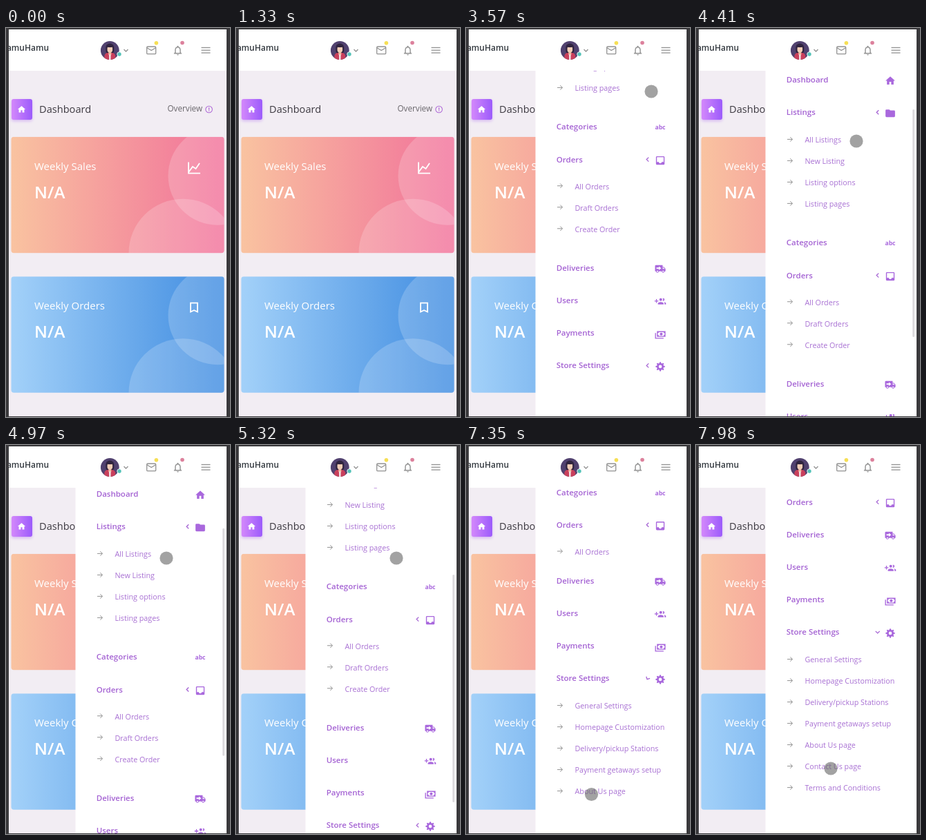
Recreate the animation shown at these times as an HTML page with a canvas. Size 324 px wide and 564 px high, loop 8 s.

```html
<!DOCTYPE html>
<html lang="en">
<head>
<meta charset="utf-8">
<title>Dashboard menu</title>
<style>
  html, body { margin: 0; width: 100%; height: 100%; overflow: hidden; background: #3a393c; }
  canvas { display: block; width: 324px; height: 564px; }
</style>
</head>
<body>
<canvas id="stage"></canvas>
<script>
const W = 324, H = 564, LOOP = 8000;
const canvas = document.getElementById('stage');
const ctx = canvas.getContext('2d');
const dpr = window.devicePixelRatio || 1;
canvas.width = W * dpr;
canvas.height = H * dpr;

const FONT = '"Open Sans", "Noto Sans", sans-serif';
const PURPLE = '#a462d3', ICON = '#a968dd', GREY = '#929292';

// Filled icons on a 24-unit grid
const ICONS = {
  home: 'M10 20v-6h4v6h5v-8h3L12 3 2 12h3v8z',
  folder: 'M10 4H4a2 2 0 0 0-2 2v12a2 2 0 0 0 2 2h16a2 2 0 0 0 2-2V8a2 2 0 0 0-2-2h-8z',
  inbox: 'M5 3h14a2 2 0 0 1 2 2v14a2 2 0 0 1-2 2H5a2 2 0 0 1-2-2V5a2 2 0 0 1 2-2zM5 5v10h4a3 3 0 0 0 6 0h4V5z',
  truck: 'M3 4h14v4h3l3 4v5h-2a3 3 0 0 1-6 0H9a3 3 0 0 1-6 0H1V6a2 2 0 0 1 2-2zM17 9.5V12h4.4l-1.9-2.5z' +
    'M4 9h5V6.5l5 4-5 4V12H4zM4.5 17a1.5 1.5 0 0 0 3 0 1.5 1.5 0 0 0-3 0zM16.5 17a1.5 1.5 0 0 0 3 0 1.5 1.5 0 0 0-3 0z',
  users: 'M8 10H5V7H3v3H0v2h3v3h2v-3h3zM10 8a3 3 0 0 0 6 0 3 3 0 0 0-6 0zM17.1 5.1a5 5 0 0 1 0 5.8 3 3 0 1 0 0-5.8z' +
    'M13 13c-2 0-6 1-6 3v2h12v-2c0-2-4-3-6-3zM19.6 13.2c.9.7 1.4 1.6 1.4 2.8v2h3v-2c0-1.5-2.4-2.5-4.4-2.8z',
  cash: 'M5 6h18v12H5zM9 8a2 2 0 0 1-2 2v4a2 2 0 0 1 2 2h10a2 2 0 0 1 2-2v-4a2 2 0 0 1-2-2z' +
    'M11 12a3 3 0 0 0 6 0 3 3 0 0 0-6 0zM1 10h2v10h16v2H1z',
  bell: 'M12 22a2 2 0 0 0 2-2h-4a2 2 0 0 0 2 2zM18 16v-5c0-3-1.6-5.6-4.5-6.3V4a1.5 1.5 0 0 0-3 0v.7C7.6 5.4 6 8 6 11v5l-2 2v1h16v-1z' +
    'M16 17H8v-6c0-2.5 1.5-4.5 4-4.5s4 2 4 4.5z'
};
for (const k in ICONS) ICONS[k] = new Path2D(ICONS[k]);

const MENU = [
  { label: 'Dashboard', icon: 'home' },
  { label: 'Listings', icon: 'folder', extra: 142, first: 40,
    subs: ['All Listings', 'New Listing', 'Listing options', 'Listing pages'] },
  { label: 'Categories', icon: 'abc' },
  { label: 'Orders', icon: 'inbox', extra: 110, first: 39,
    subs: ['All Orders', 'Draft Orders', 'Create Order'] },
  { label: 'Deliveries', icon: 'truck' },
  { label: 'Users', icon: 'users' },
  { label: 'Payments', icon: 'cash' },
  { label: 'Store Settings', icon: 'gear', extra: 218, first: 40, settings: true,
    subs: ['General Settings', 'Homepage Customization', 'Delivery/pickup Stations',
      'Payment getaways setup', 'About Us page', 'Contact Us page', 'Terms and Conditions'] }
];

// Keys are [time, value, value...]
const SCROLL = [[4060, 253], [4390, 85], [4930, 85], [5280, 191], [5380, 191], [5620, 253]];
const POINTER = [
  [2300, 332, 120], [2650, 287, 33], [2950, 287, 33], [3500, 268, 92], [3600, 268, 92],
  [3850, 232, 164], [5800, 232, 164], [6660, 173, 498], [7180, 173, 498], [7380, 182, 507], [7800, 195, 469]
];

const ramp = (t, a, b) => Math.min(1, Math.max(0, (t - a) / (b - a)));
const smooth = x => x * x * (3 - 2 * x);

function track(keys, t) {
  let i = 0;
  while (i < keys.length - 2 && t > keys[i + 1][0]) i++;
  const a = keys[i], b = keys[i + 1], p = smooth(ramp(t, a[0], b[0]));
  return a.slice(1).map((v, n) => v + (b[n + 1] - v) * p);
}

function rect(x, y, w, h, fill, r = 0) {
  ctx.beginPath();
  ctx.roundRect(x, y, w, h, r);
  ctx.fillStyle = fill;
  ctx.fill();
}

function disc(x, y, r, fill) {
  ctx.beginPath();
  ctx.arc(x, y, r, 0, Math.PI * 2);
  ctx.fillStyle = fill;
  ctx.fill();
}

function line(points, color, width = 1.2, closed = false) {
  ctx.beginPath();
  points.forEach(([x, y]) => ctx.lineTo(x, y));
  if (closed) ctx.closePath();
  ctx.strokeStyle = color;
  ctx.lineWidth = width;
  ctx.stroke();
}

function text(s, x, y, size, color, weight = 400, align = 'left') {
  ctx.font = `${weight} ${size}px ${FONT}`;
  ctx.textAlign = align;
  ctx.fillStyle = color;
  ctx.fillText(s, x, y);
}

function clipTo(x, y, w, h, draw) {
  ctx.save();
  ctx.beginPath();
  ctx.rect(x, y, w, h);
  ctx.clip();
  draw();
  ctx.restore();
}

function gradient(x0, x1, from, to) {
  const g = ctx.createLinearGradient(x0, 0, x1, 0);
  g.addColorStop(0, from);
  g.addColorStop(1, to);
  return g;
}

function gear(x, y) {
  ctx.beginPath();
  for (let i = 0; i < 32; i++) {
    const a = (i - 0.5) * Math.PI / 16, r = i % 4 < 2 ? 6.8 : 5;
    ctx.lineTo(x + r * Math.cos(a), y + r * Math.sin(a));
  }
  ctx.closePath();
  ctx.arc(x, y, 2.3, 0, Math.PI * 2);
  ctx.fillStyle = ICON;
  ctx.fill('evenodd');
}

function icon(name, x, y, size, color) {
  if (name === 'gear') return gear(x, y);
  if (name === 'abc') return text('abc', x, y + 2.5, 8.6, color, 700, 'center');
  ctx.save();
  ctx.translate(x - size / 2, y - size / 2);
  ctx.scale(size / 24, size / 24);
  ctx.fillStyle = color;
  ctx.fill(ICONS[name], 'evenodd');
  ctx.restore();
}

function chevron(x, y, angle, color, r = 3) {
  ctx.save();
  ctx.translate(x, y);
  ctx.rotate(angle);
  line([[r / 2, -r], [-r / 2, 0], [r / 2, r]], color, 1.3);
  ctx.restore();
}

function avatar(x, y) {
  ctx.save();
  ctx.beginPath();
  ctx.arc(x, y, 13.4, 0, Math.PI * 2);
  ctx.clip();
  rect(x - 14, y - 14, 28, 28, '#51416f');
  rect(x - 6, y - 10, 12, 16, '#30243f', 6);
  rect(x - 8, y + 3.5, 16, 12, '#c9405c', 5);
  rect(x - 2, y + 1, 4, 6, '#eab99f', 1);
  rect(x - 3.8, y - 6.5, 7.6, 9.5, '#f3cdb6', 3.8);
  rect(x - 4, y - 8, 8, 3.4, '#30243f', 2);
  rect(x - 1.2, y + 6, 2.4, 8, '#f2e9ee');
  ctx.restore();
  disc(164, 38, 3.6, '#fff');
  disc(164, 38, 2.7, '#55c3b8');
}

function header() {
  rect(4, 2, 315, 60, '#fff');
  text('amuHamu', 62, 33, 12, '#343a40', 600, 'right');
  avatar(150.3, 32.5);
  chevron(173.5, 32.5, -Math.PI / 2, GREY);
  ctx.strokeStyle = GREY;
  ctx.lineWidth = 1.3;
  ctx.beginPath();
  ctx.roundRect(203.7, 27, 13, 10.6, 1.2);
  ctx.stroke();
  line([[204, 28.7], [210.2, 32.6], [216.4, 28.7]], GREY, 1.3);
  disc(217.4, 21.7, 2.8, '#f6df55');
  icon('bell', 248.5, 32.5, 17, GREY);
  disc(255, 21.5, 2.8, '#dc819c');
  for (const y of [28.4, 32.2, 36]) rect(282.5, y - 0.6, 13, 1.3, GREY);
}

function card(y, from, to, title) {
  ctx.save();
  ctx.beginPath();
  ctx.roundRect(7.5, y, 308, 168.5, 4);
  ctx.clip();
  rect(7, y, 309, 169, gradient(7, 316, from, to));
  disc(306, y + 56.5, 71.5, 'rgba(255,255,255,.19)');
  disc(256, y + 168.5, 78.5, 'rgba(255,255,255,.19)');
  ctx.restore();
  text(title, 41, y + 48, 15, '#fff');
  text('N/A', 41, y + 89, 24.2, '#fff', 600);
}

function page() {
  rect(4, 62, 315, 501, '#f2edf3');
  ctx.save();
  ctx.shadowColor = 'rgba(170,100,240,.4)';
  ctx.shadowBlur = 4 * dpr;
  ctx.shadowOffsetY = 2 * dpr;
  rect(8, 103, 30, 30, gradient(8, 38, '#d388fb', '#9c5bfb'), 3);
  ctx.restore();
  icon('home', 22.5, 118, 13.5, '#fff');
  text('Dashboard', 48, 122.5, 14.6, '#3e3b42', 500);
  text('Overview', 284, 121.3, 11.7, '#6a676c', 400, 'right');
  ctx.beginPath();
  ctx.arc(293.6, 118, 4.8, 0, Math.PI * 2);
  ctx.strokeStyle = '#b06bd8';
  ctx.lineWidth = 1.1;
  ctx.stroke();
  rect(293, 115.3, 1.2, 3.4, '#b06bd8');
  rect(293, 119.6, 1.2, 1.2, '#b06bd8');

  card(157.7, '#f9c3a0', '#f1709a', 'Weekly Sales');
  line([[264, 194.5], [264, 210.6], [281, 210.6]], '#fff', 1.8);
  line([[264.5, 208.5], [270, 201], [274.5, 204], [280, 196]], '#fff', 1.8);
  card(360.2, '#a3d1f9', '#3e8be0', 'Weekly Orders');
  line([[267, 398.6], [277, 398.6], [277, 411.6], [272, 409.3], [267, 411.6]], '#fff', 1.8, true);
}

function subItem(label, y) {
  line([[132, y - 0.8], [139.3, y - 0.8]], GREY, 1);
  line([[136.3, y - 4], [139.5, y - 0.8], [136.3, y + 2.4]], GREY, 1);
  text(label, 157.5, y + 4, 10.75, '#a870d3');
}

function sidebar(t) {
  const open = smooth(ramp(t, 2850, 3100));
  if (!open) return;
  const swap = smooth(ramp(t, 7130, 7480));
  const scroll = track(SCROLL, t)[0] - 34 * swap;
  clipTo(4, 62, 315, 501, () => {
    ctx.translate((1 - open) * 219, 0);
    rect(100.5, 62, 219, 501, '#fff');
    let y = 160 - scroll;
    for (const item of MENU) {
      text(item.label, 130.7, y + 4, 11.5, PURPLE, 600);
      icon(item.icon, 281, y + 1.5, 16.5, ICON);
      if (item.subs) {
        const shown = item.settings ? swap : 1 - swap;
        const top = y + 23;
        chevron(262.7, y, item.settings ? -Math.PI / 2 * swap : 0, PURPLE);
        clipTo(101, top, 218, item.extra * shown, () =>
          item.subs.forEach((s, i) => subItem(s, y + item.first + i * 31)));
        y += item.extra * shown;
      }
      y += 47.2;
    }
    ctx.globalAlpha = ramp(t, 4060, 4160) * (1 - ramp(t, 5600, 5700));
    rect(313.2, 62 + 0.66 * scroll, 2.8, 330, '#dcdadd', 1.4);
  });
}

function draw(t) {
  ctx.setTransform(dpr, 0, 0, dpr, 0, 0);
  rect(0, 0, W, H, '#3a393c');
  clipTo(4, 2, 315, 561, () => {
    page();
    header();
    sidebar(t);
    if (t >= 2300) {
      const [x, y] = track(POINTER, t);
      disc(x, y, 9.6, 'rgba(100,100,100,.6)');
    }
  });
}

const start = performance.now();
function tick() {
  draw((performance.now() - start) % LOOP);
  requestAnimationFrame(tick);
}
tick();
</script>
</body>
</html>
```
